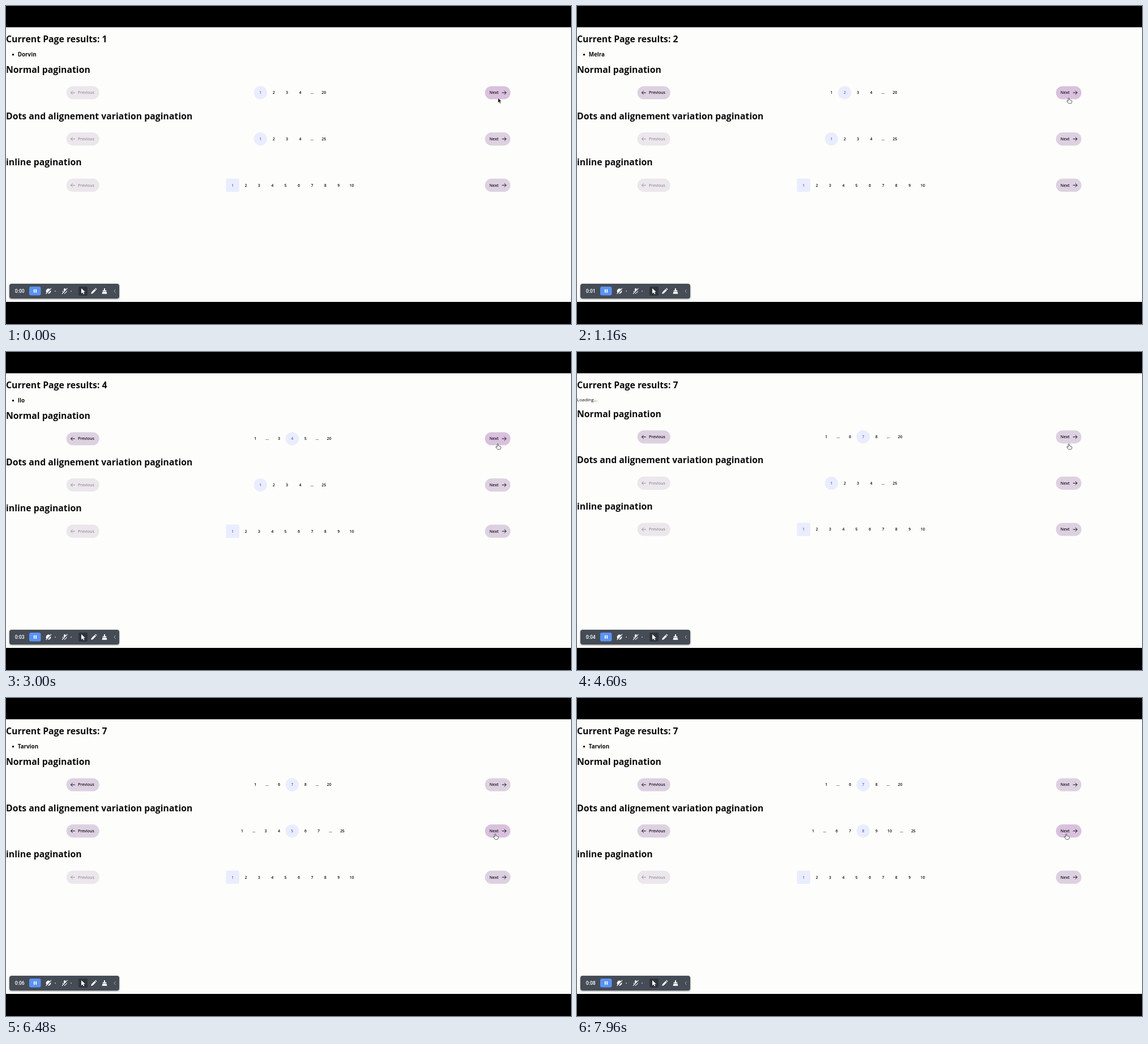
Animation, 998 px wide and 561 px high, one loop 8 s. Source, as an HTML page:

```html
<!DOCTYPE html>
<html lang="en">
<head>
<meta charset="utf-8">
<title>Pagination demo</title>
<style>
  html, body { margin: 0; width: 100%; height: 100%; overflow: hidden; background: #000; }
  svg { display: block; width: 100%; height: 100%; }
  text { font-family: "Open Sans", "Noto Sans", sans-serif; fill: #0b0b0d; }
  .heading { font-size: 15.8px; font-weight: 700; }
  .name { font-size: 9.8px; font-weight: 700; }
  .loading { font-size: 8px; }
  .label { font-size: 7px; font-weight: 600; }
  .page { font-size: 6.9px; font-weight: 600; text-anchor: middle; }
  .clock { font: 500 8.6px Roboto, sans-serif; fill: #fff; }
  #panel { filter: drop-shadow(.5px 1px 1.5px rgba(0, 0, 0, .45)); }
</style>
</head>
<body>
<svg id="stage" viewBox="0 0 998 561">
  <rect y="37.5" width="998" height="484.5" fill="#fdfdfb"/>
  <g id="content"></g>
  <g id="toolbar">
    <rect id="panel" x="6" y="490" width="194" height="26" rx="4" fill="#454c56"/>
    <text id="clock" class="clock" x="15.8" y="505.8"></text>
    <rect x="41" y="495" width="20.5" height="15.5" rx="3" fill="#5b93f3"/>
    <path d="M49.8 499.8v6M53.2 499.8v6" stroke="#fff" stroke-width="1.8"/>
    <g fill="#fff">
      <circle cx="75" cy="503" r="4.4"/>
      <rect x="102" y="498" width="3.4" height="6" rx="1.7"/>
      <circle cx="87" cy="503" r="1" opacity=".6"/>
      <circle cx="115" cy="503" r="1" opacity=".6"/>
    </g>
    <path d="M100 502.5q0 3.6 3.7 3.6t3.7-3.6M103.7 506v2" fill="none" stroke="#fff"/>
    <path d="M71 508.5l9.5-10M99.5 508.5l9.5-10" stroke="#454c56" stroke-width="2.4"/>
    <path d="M70.5 507.8l9.5-10M99 507.8l9.5-10" stroke="#fff" stroke-width="1.1"/>
    <rect x="128" y="495" width="16" height="16" rx="2" fill="#30343d"/>
    <path d="M133 498v9.2l2.3-2 1.6 3.3 1.5-.7-1.5-3.2h3z" fill="#fff"/>
    <path d="M150.2 507.8l.6-2.9 5.7-5.7 2.3 2.3-5.7 5.7zM157.2 498.5l1-1 2.3 2.3-1 1z" fill="#fff"/>
    <path d="M173 498h2v3.5h2.3v2h-6.6v-2h2.3zM170.4 504.2h7.2l.9 3.6h-9z" fill="#fff"/>
    <path d="M193.5 500l-2.5 3 2.5 3" fill="none" stroke="#aab0b8" stroke-width=".9"/>
  </g>
  <g id="pointer">
    <path id="arrow" d="M0 0v8.6l2-1.8 1.5 3.2 1.5-.7-1.5-3.1h2.7z" fill="#080808" stroke="#fff" stroke-width=".6"/>
    <path id="hand" d="M-1.4 5V.7q0-.9.9-.9t.9.9v2.7q1.3-.5 1.7.4 1.2-.4 1.6.5 1.3-.2 1.3 1V7q0 2.6-2.2 2.6H-.2Q-1.1 9.6-2 8.1L-3.7 5.6q-.5-.9.3-1.2.8-.2 2 1.4z"
      fill="#fff" stroke="#34343a" stroke-width=".8" stroke-linejoin="round"/>
  </g>
</svg>
<script>
const LOOP = 8000;
const CENTER = 505.5, CELL = 23.4, DOTS = 18.4;
const $ = id => document.getElementById(id);

// Each visit: click time, loading time, listed name.
const visits = [
  [0, 0, 'Dorvin'], [560, 320, 'Melra'], [1400, 320, 'Onna'], [2200, 360, 'Ilo'],
  [3160, 0, 'Calvorn'], [3840, 0, 'Tressa'], [4480, 360, 'Tarvion']
];
const dottedClicks = [0, 5400, 5760, 6080, 6400, 6720, 7000, 7640];
const selection = [7000, 7640];
const travel = [4900, 5360];

const text = (cls, x, y, value, style = '') =>
  `<text class="${cls}" x="${x}" y="${y}" style="${style}">${value}</text>`;

const countUntil = (times, t) => times.filter(time => time <= t).length;

function pageItems(page, total, siblings) {
  let low = page - siblings;
  const high = Math.max(page + siblings, 4);
  if (low <= 2) low = 1;
  const items = low > 1 ? [1, '...'] : [];
  for (let n = low; n <= high; n++) items.push(n);
  return [...items, '...', total];
}

function button(x, width, y, fill, ink, arrow, label) {
  const next = label === 'Next';
  return `<rect x="${x}" y="${y - 11.6}" width="${width}" height="23.2" rx="11.6" fill="${fill}"/>
    <path transform="translate(${next ? 876 : 114} ${y})" d="${arrow}" fill="none" stroke="${ink}"
      stroke-linecap="round" stroke-linejoin="round"/>` +
    text('label', next ? 854 : 127, y + 2.4, label, `fill:${ink}`);
}

function pager(y, items, current, { hover = false, selected = false, square = false } = {}) {
  const first = current === 1;
  let out = button(106.7, 58, y, first ? '#ebe7ec' : '#ddd1e1', first ? '#98949a' : '#17141c',
    'M7.5 0H.5M3.5-3L.5 0l3 3', 'Previous');
  out += button(846, 45, y, hover ? '#d9c1de' : '#ddd1e1', '#17141c', 'M.5 0h7M4.5-3l3 3-3 3', 'Next');
  if (selected) {
    out += `<rect x="854" y="${y - 5.6}" width="16.8" height="11.2" fill="#2f60c0"/>` +
      text('label', 854, y + 2.4, 'Next', 'fill:#fff');
  }
  const widthOf = item => item === '...' ? DOTS : CELL;
  let x = CENTER - items.reduce((sum, item) => sum + widthOf(item), 0) / 2;
  for (const item of items) {
    const width = widthOf(item), active = item === current;
    if (active) {
      out += `<rect x="${x}" y="${y - 11.7}" width="${CELL}" height="${CELL}" rx="${square ? 2 : 11.7}" fill="#eaedfd"/>`;
    }
    out += text('page', x + width / 2, y + 2.4, item, active ? 'fill:#6462d8' : '');
    x += width;
  }
  return out;
}

function scene(t) {
  const page = countUntil(visits.map(v => v[0]), t);
  const [clicked, wait, name] = visits[page - 1];
  const loading = t < clicked + wait;
  const dotted = countUntil(dottedClicks, t);
  const inline = Array.from({ length: 10 }, (_, i) => i + 1);
  const list = loading
    ? text('loading', 0, 87, 'Loading...')
    : '<circle cx="12.5" cy="85.8" r="1.7"/>' + text('name', 20.8, 88.8, name);
  return text('heading', 0, 63.8, `Current Page results: ${page}`) + list +
    `<g transform="translate(0 ${loading ? -3.2 : 0})">` +
    text('heading', 0, 118, 'Normal pagination') +
    pager(153, pageItems(page, 20, 1), page, { hover: !loading && t < travel[0] + 60 }) +
    text('heading', 0, 199.6, 'Dots and alignement variation pagination') +
    pager(234.6, pageItems(dotted, 25, dotted < 3 ? 1 : 2), dotted, {
      hover: t > travel[1] - 140,
      selected: t >= selection[0] && t < selection[1]
    }) +
    text('heading', 0, 281.2, 'inline pagination') +
    pager(316.2, inline, 1, { square: true }) + '</g>';
}

let shown = '';
function draw(now) {
  const t = now % LOOP;
  const markup = scene(t);
  if (markup !== shown) $('content').innerHTML = shown = markup;
  $('clock').textContent = `0:0${Math.floor((t + 100) / 1000)}`;

  const p = Math.min(1, Math.max(0, (t - travel[0]) / (travel[1] - travel[0])));
  const ease = p * p * (3 - 2 * p);
  const arrow = t < 120 || (p > .15 && p < .7);
  $('pointer').setAttribute('transform', `translate(${869.1 - 4.5 * ease} ${162.3 + 77.5 * ease})`);
  $('arrow').style.display = arrow ? '' : 'none';
  $('hand').style.display = arrow ? 'none' : '';
  requestAnimationFrame(draw);
}
draw(performance.now());
</script>
</body>
</html>
```
